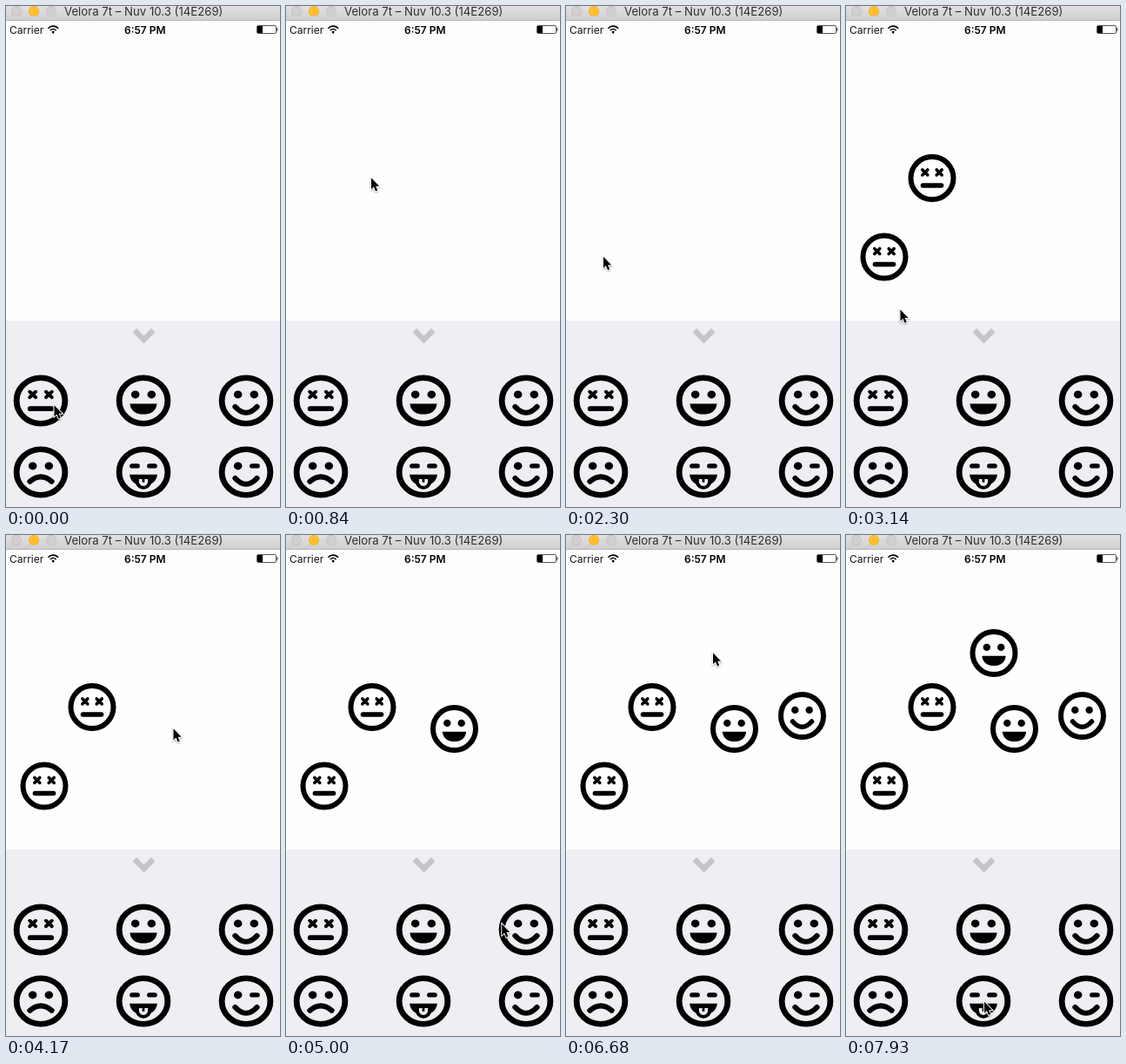
An HTML page with a canvas that plays this animation: 315x575 px, repeating every 8 s.

```html
<!DOCTYPE html>
<html lang="en">
<head>
<meta charset="utf-8">
<title>Emoji keyboard</title>
<style>
  html, body { margin: 0; width: 100%; height: 100%; overflow: hidden; background: #fefefe; }
  canvas { display: block; width: 315px; height: 575px; }
</style>
</head>
<body>
<canvas id="stage" width="315" height="575"></canvas>
<script>
const ctx = document.getElementById('stage').getContext('2d');
const LOOP = 8000;
const STEP = 208.5; // the screen refreshes in ticks of this many ms
const FONT = 'Inter, Roboto, sans-serif';
const KEYS_BG = '#efeef3';
const HOME = { x: 55, y: 458 };

// Pointer moves in ticks; a move with a face drops it at its end
const moves = [
  { from: 1, to: 4, x: 97.5, y: 197, face: 'dead', shown: 12 },
  { from: 6, to: 11, x: 42.5, y: 287.5, via: { x: 27, y: 463 }, face: 'dead' },
  { from: 15, to: 20, x: 192, y: 222, via: { x: 148, y: 494 }, face: 'grin' },
  { from: 22, to: 26, x: 270, y: 207, via: { x: 262, y: 466 }, face: 'smile' },
  { from: 29, to: 29, x: 168, y: 456 },
  { from: 31, to: 32, x: 168.5, y: 135, face: 'grin' },
  { from: 35, to: 38, x: 158.5, y: 535.5, via: { x: 92, y: 495 } }
];

const keys = [['dead', 'grin', 'smile'], ['frown', 'tongue', 'wink']];

const ease = u => u * u * (3 - 2 * u);

// Quadratic curve that passes through "mid" at its half
function through(a, mid, b, u) {
  const ctrl = 2 * mid - (a + b) / 2;
  return (1 - u) ** 2 * a + 2 * u * (1 - u) * ctrl + u * u * b;
}

function pointerAt(tick) {
  const i = moves.findLastIndex(m => tick >= m.from);
  if (i < 0) return HOME;
  const a = moves[i - 1] || HOME, b = moves[i];
  const mid = b.via || { x: (a.x + b.x) / 2, y: (a.y + b.y) / 2 };
  const u = ease(Math.min(1, (tick - b.from + 1) / (b.to - b.from + 1)));
  return { x: through(a.x, mid.x, b.x, u), y: through(a.y, mid.y, b.y, u) };
}

function line(width, ...pts) {
  ctx.lineWidth = width;
  ctx.beginPath();
  pts.forEach(([x, y]) => ctx.lineTo(x, y));
  ctx.stroke();
}

function dot(x, y, r) {
  ctx.beginPath();
  ctx.arc(x, y, r, 0, Math.PI * 2);
  ctx.fill();
}

function curve(y, peak) {
  ctx.lineWidth = 5.5;
  ctx.beginPath();
  ctx.moveTo(-11, y);
  ctx.quadraticCurveTo(0, peak * 2 - y, 11, y);
  ctx.stroke();
}

function bowl(y, w, h) {
  ctx.beginPath();
  ctx.moveTo(-w, y);
  ctx.lineTo(w, y);
  ctx.bezierCurveTo(w - 1, y + h * 0.75, w * 0.5, y + h, 0, y + h);
  ctx.bezierCurveTo(-w * 0.5, y + h, 1 - w, y + h * 0.75, -w, y);
  ctx.fill();
}

function tongue(w, top, bottom) {
  ctx.beginPath();
  ctx.moveTo(-w, top);
  ctx.lineTo(w, top);
  ctx.arc(0, bottom - w, w, 0, Math.PI);
  ctx.fill();
}

const eye = side => dot(side * 8.2, -6.6, 4.2);
const eyes = () => { eye(-1); eye(1); };
const wink = side => line(5, [side * 6.1, -6.6], [side * 11.4, -6.6]);

function cross(x) {
  line(3.6, [x - 3, -9.6], [x + 3, -3.6]);
  line(3.6, [x + 3, -9.6], [x - 3, -3.6]);
}

const features = {
  dead() { cross(-8.2); cross(8.2); line(5.4, [-10.6, 8.5], [10.6, 8.5]); },
  grin() { eyes(); bowl(3.2, 13.7, 11.3); },
  smile() { eyes(); curve(6.5, 12.8); },
  frown() { eyes(); curve(10, 5); },
  wink() { eye(-1); wink(1); curve(6.5, 12.8); },
  tongue() {
    wink(-1);
    wink(1);
    bowl(2.6, 14, 11.5);
    tongue(8.2, 5, 18.3);
    ctx.fillStyle = KEYS_BG;
    tongue(4.5, 7.4, 14.8);
    line(2.4, [0, 7], [0, 10]);
  }
};

function face(kind, x, y, sx = 1, sy = 1) {
  ctx.save();
  ctx.translate(x, y);
  ctx.scale(sx, sy);
  ctx.fillStyle = ctx.strokeStyle = '#000';
  ctx.lineCap = 'round';
  ctx.lineWidth = 6;
  ctx.beginPath();
  ctx.arc(0, 0, 24.5, 0, Math.PI * 2);
  ctx.stroke();
  features[kind]();
  ctx.restore();
}

function text(str, x, y, font, color) {
  ctx.font = `${font} ${FONT}`;
  ctx.fillStyle = color;
  ctx.fillText(str, x, y);
}

function titleBar() {
  const shade = ctx.createLinearGradient(0, 0, 0, 16);
  shade.addColorStop(0, '#e2e0e2');
  shade.addColorStop(1, '#d0ced0');
  ctx.fillStyle = shade;
  ctx.fillRect(0, 0, 315, 16);
  ctx.fillStyle = '#b9b7b9';
  ctx.fillRect(0, 16, 315, 1);
  ['#d0ced0', '#fdbe2f', '#d0ced0'].forEach((color, i) => {
    ctx.fillStyle = i === 1 ? '#efb32f' : '#bebcbe';
    dot(12 + 20 * i, 6, 6.1);
    ctx.fillStyle = color;
    dot(12 + 20 * i, 6, 5.5);
  });
  text('Velora 7t – Nuv 10.3 (14E269)', 67, 11, '13.2px', '#2f2e2f');
}

function statusBar() {
  text('Carrier', 4, 32, '12px', '#111');
  text('6:57 PM', 136, 32, '600 12px', '#000');

  ctx.strokeStyle = ctx.fillStyle = '#000';
  ctx.lineCap = 'butt';
  ctx.lineWidth = 1.7;
  const fan = r => ctx.arc(54.2, 31.2, r, -Math.PI * 0.76, -Math.PI * 0.24);
  [4.7, 8].forEach(r => {
    ctx.beginPath();
    fan(r);
    ctx.stroke();
  });
  ctx.beginPath();
  ctx.moveTo(54.2, 32);
  fan(2.4);
  ctx.fill();

  ctx.strokeStyle = '#555';
  ctx.lineWidth = 1;
  ctx.beginPath();
  ctx.roundRect(288.5, 22.5, 22, 9, 1.5);
  ctx.stroke();
  ctx.fillRect(289, 23, 6, 8);
  ctx.fillStyle = '#555';
  ctx.fillRect(311, 25.5, 1.5, 3);
}

function keyboard() {
  ctx.fillStyle = KEYS_BG;
  ctx.fillRect(0, 361, 315, 214);
  ctx.strokeStyle = '#c5c5c7';
  ctx.lineCap = 'butt';
  line(6.4, [147.8, 372.3], [158.5, 383], [169.2, 372.3]);
  keys.forEach((row, j) => row.forEach((kind, i) =>
    face(kind, 40 + 118 * i, 453 + 82 * j, 1.138, 1.075)));
}

function arrow({ x, y }) {
  ctx.save();
  ctx.translate(x + 0.5, y + 0.3);
  ctx.scale(0.95, 0.95);
  ctx.beginPath();
  [[0, 0], [0, 13.6], [3.1, 10.8], [5.3, 16], [7.6, 15], [5.4, 10], [9.6, 10]].forEach(([a, b]) => ctx.lineTo(a, b));
  ctx.closePath();
  ctx.lineWidth = 2;
  ctx.strokeStyle = '#fff';
  ctx.shadowColor = 'rgba(0,0,0,0.35)';
  ctx.shadowBlur = 2;
  ctx.shadowOffsetY = 1;
  ctx.stroke();
  ctx.shadowColor = 'transparent';
  ctx.fillStyle = '#000';
  ctx.fill();
  ctx.restore();
}

function draw(t) {
  const tick = Math.floor(t / STEP);
  ctx.fillStyle = '#fefefe';
  ctx.fillRect(0, 0, 315, 575);
  titleBar();
  statusBar();
  keyboard();
  moves.forEach(m => {
    if (m.face && tick >= (m.shown || m.to + 1)) face(m.face, m.x + 1.5, m.y + 0.5);
  });
  arrow(pointerAt(tick));
}

const start = performance.now();
function loop() {
  draw((performance.now() - start) % LOOP);
  requestAnimationFrame(loop);
}
loop();
</script>
</body>
</html>
```
